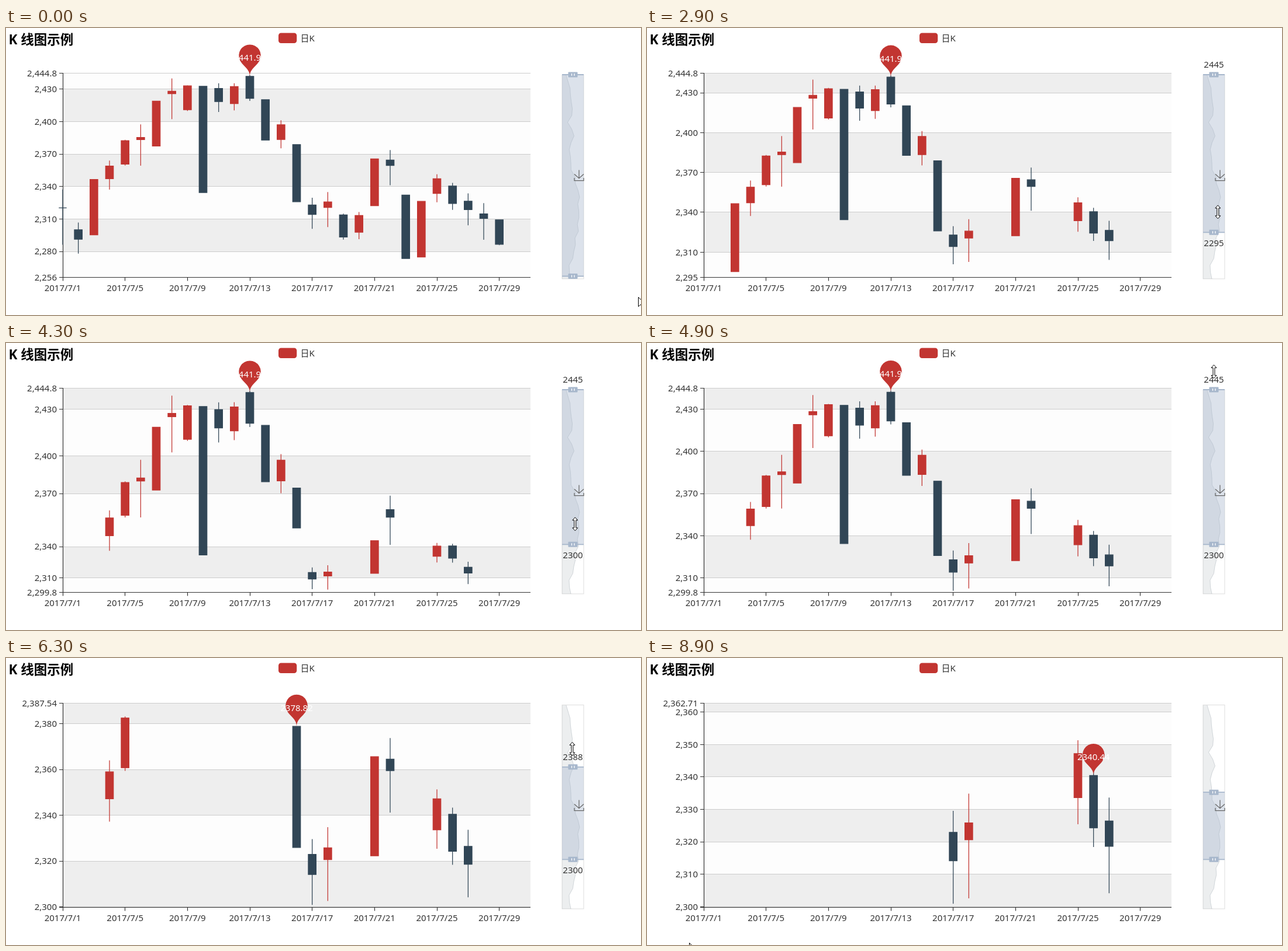
These frames come from a looping animation (1086 by 492 pixels, 9200 ms). An HTML page:

```html
<!DOCTYPE html>
<html lang="zh">
<head>
<meta charset="utf-8">
<style>
html, body { margin: 0; width: 100%; height: 100%; overflow: hidden; background: #fff; }
svg { display: block; font: 15px "Noto Sans", "Noto Sans CJK SC", "Noto Sans CJK", sans-serif; fill: #333; }
</style>
</head>
<body>
<svg id="stage" width="1086" height="492" viewBox="0 0 1086 492"></svg>
<script>
const LOOP = 9200, STEP = 100;
const LEFT = 97, RIGHT = 897, TOP = 77.5, BOTTOM = 427.5, GAP = 800 / 30;
const RED = '#c23531', DARK = '#314656', BLUE = '#a7b7cc';

// Short bodies get long wicks; the upper wick is half the lower one
function makeCandle([open, close]) {
  const wick = Math.max(0, 34 - 7 * Math.sqrt(Math.abs(close - open)));
  return { open, close, low: Math.min(open, close) - wick, high: Math.max(open, close) + wick / 2 };
}

// Daily open and close
const candles = [
  [2320.26, 2320.26], [2300, 2291.3], [2295.35, 2346.5], [2347.22, 2358.98], [2360.75, 2382.48],
  [2383.43, 2385.42], [2377.41, 2419.02], [2425.92, 2428.15], [2411, 2433.13], [2432.68, 2334.48],
  [2430.69, 2418.53], [2416.62, 2432.4], [2441.91, 2421.56], [2420.26, 2382.91], [2383.49, 2397.18],
  [2378.82, 2325.95], [2322.94, 2314.16], [2320.62, 2325.82], [2313.74, 2293.34], [2297.77, 2313.22],
  [2322.32, 2365.59], [2364.54, 2359.51], [2332.08, 2273.4], [2274.81, 2326.31], [2333.61, 2347.18],
  [2340.44, 2324.29], [2326.42, 2318.61], [2314.68, 2310.59], [2309.16, 2286.6]
].map(makeCandle);

// Turning points of the two slider handles: time, value
const lowKeys = [[1862, 2256], [1900, 2259.33], [2700, 2277], [2870, 2295], [3600, 2345], [4170, 2326], [4270, 2299.8]];
const highKeys = [[5400, 2444.8], [5700, 2408.36], [6950, 2362.71]];

const mix = (a, b, p) => a + (b - a) * p;

function track(keys, t) {
  const i = keys.findIndex(k => k[0] > t);
  if (i === 0) return keys[0][1];
  if (i < 0) return keys[keys.length - 1][1];
  const [t0, v0] = keys[i - 1], [t1, v1] = keys[i];
  return mix(v0, v1, (t - t0) / (t1 - t0));
}

const handles = t => ({ lo: track(lowKeys, t), hi: track(highKeys, t) });
const filterRange = t => handles(t - 30);   // the filter trails the handles

// The drawn scale eases towards the filtered range
function viewRange(t) {
  const a = filterRange(t - STEP), b = filterRange(t);
  return { lo: mix(a.lo, b.lo, 0.62), hi: mix(a.hi, b.hi, 0.62) };
}

const xAt = i => LEFT + i * GAP;
const scaleFor = ({ lo, hi }) => v => TOP + (hi - v) / (hi - lo) * (BOTTOM - TOP);
const sliderY = v => 80 + (2444.8 - v) * 1.83;

function isShown(candle, t) {
  const { lo, hi } = filterRange(t);
  return candle.low >= lo && candle.high <= hi;
}

const rect = (x, y, w, h, fill, more = '') =>
  `<rect x="${x}" y="${y}" width="${w}" height="${Math.max(0, h)}" fill="${fill}" ${more}/>`;
const stroke = (d, color, width = 1, more = '') =>
  `<path d="${d}" fill="none" stroke="${color}" stroke-width="${width}" ${more}/>`;
const text = (s, x, y, anchor = 'middle', more = '') =>
  `<text x="${x}" y="${y + 5.3}" text-anchor="${anchor}" ${more}>${s}</text>`;
const crisp = y => Math.floor(y) + 0.5;

function tickValues({ lo, hi }) {
  const raw = (hi - lo) / 5, unit = 10 ** Math.floor(Math.log10(raw)), f = raw / unit;
  const step = unit * (f < 1.5 ? 1 : f < 2.5 ? 2 : f < 4 ? 3 : f < 7 ? 5 : 10);
  const values = [];
  for (let v = Math.ceil(lo / step) * step; v < hi; v += step) if (v > lo) values.push(v);
  return values;
}

function axes(t) {
  const range = filterRange(t), { lo, hi } = range;
  const moving = scaleFor(viewRange(t)), settled = scaleFor(range);
  const before = tickValues(filterRange(t - STEP));
  const digits = hi - lo < 150 ? 2 : 1;
  // Ticks that were there already glide, new ones start in their final place
  const tickY = v => Math.min(BOTTOM, Math.max(TOP, (before.includes(v) ? moving : settled)(v)));
  const ticks = [{ v: lo, y: BOTTOM }, ...tickValues(range).map(v => ({ v, y: tickY(v) })), { v: hi, y: TOP }];

  const last = ticks.length - 1;
  let bands = '', lines = '', marks = '', labels = '';
  ticks.forEach((k, i) => {
    const next = ticks[i + 1];
    if (next) bands += rect(LEFT, next.y, RIGHT - LEFT, k.y - next.y, i % 2 ? '#eee' : '#fdfdfd');
    lines += `M${LEFT} ${crisp(k.y)}H${RIGHT}`;
    marks += `M91 ${crisp(k.y)}H${LEFT}`;
    const crowded = i === 0 && k.y - ticks[1].y < 13 || i === last && ticks[i - 1].y - k.y < 13;
    if (!crowded) {
      labels += text(k.v.toLocaleString('en-US', { maximumFractionDigits: digits }), 87, k.y, 'end');
    }
  });
  for (let i = 0; i < candles.length; i += 4) {
    marks += `M${crisp(xAt(i))} ${BOTTOM}v6`;
    labels += text('2017/7/' + (i + 1), xAt(i), 445.5);
  }
  marks += `M97.5 ${TOP - 0.5}V${BOTTOM}M${LEFT} ${BOTTOM}H${RIGHT}`;
  return bands + stroke(lines, '#ccc') + stroke(marks, '#333', 1.2) + labels;
}

// Candles that come back into range grow out of their opening value
function growth(candle, t) {
  let missing = 0.5;
  for (let i = 1; i <= 3; i++, missing /= 3) {
    if (!isShown(candle, t - i * STEP)) return 1 - missing;
  }
  return 1;
}

function drawCandle(candle, i, t, y) {
  if (!isShown(candle, t)) return '';
  const p = growth(candle, t), base = y(candle.open);
  const [close, low, high] = [candle.close, candle.low, candle.high].map(v => mix(base, y(v), p));
  const color = candle.close > candle.open ? RED : DARK;
  const x = xAt(i), top = Math.min(base, close), bottom = Math.max(base, close);
  return rect(x - 6.7, top, 13.4, bottom - top, color) +
    stroke(`M${x - 6.7} ${top}h13.4V${bottom}h-13.4ZM${x} ${top}V${high}M${x} ${bottom}V${low}`, color, 1.25);
}

// The pin marks the highest opening value in range
function pinTarget(t) {
  const shown = candles.filter(c => isShown(c, t));
  const best = shown.reduce((a, c) => c.open > a.open ? c : a);
  return { open: best.open, x: xAt(candles.indexOf(best)), y: scaleFor(viewRange(t))(best.open) };
}

function pin(t) {
  const now = pinTarget(t), before = pinTarget(t - STEP);
  const p = now.open === before.open ? 1 : 0.8;
  const x = mix(before.x, now.x, p), y = mix(before.y, now.y, p);
  const r = 18.75, h = 62.5, dy = r * r / (h - r), cy = -h + r + dy;
  const sin = dy / r, cos = Math.sqrt(1 - sin * sin), dx = cos * r;
  const bendX = dx - sin * r * 0.6, bendY = cy + dy + cos * r * 0.6, tip = -r * 0.7;
  const d = `M${-dx} ${cy + dy}A${r} ${r} 0 1 1 ${dx} ${cy + dy}` +
    `C${bendX} ${bendY} 0 ${tip} 0 0C0 ${tip} ${-bendX} ${bendY} ${-dx} ${cy + dy}Z`;
  return `<g transform="translate(${x} ${y})"><path d="${d}" fill="${RED}"/>` +
    text(now.open.toFixed(2), 0, -h / 2 - 0.5, 'middle', 'fill="#fff"') + '</g>';
}

function grip(y) {
  return stroke(`M951 ${y}H988`, BLUE, 1.8) + rect(961.5, y - 4.5, 16, 9, BLUE, 'rx="1"') +
    stroke(`M967.5 ${y - 2}v4M972 ${y - 2}v4`, '#fff', 1.3);
}

function slider(t) {
  const { lo, hi } = handles(t), yLo = sliderY(lo), yHi = sliderY(hi);
  const curve = candles.map((c, i) => `${963 + (c.open - 2295) * 0.1226} ${430 - i * 35 / 3}`).join('L') + 'L958 81';
  let out = rect(951, 80.5, 37, 349.5, '#fff', 'stroke="#ddd"') +
    `<path d="M951 430L${curve}H951Z" fill="#2f4554" fill-opacity=".09"/>` +
    stroke('M' + curve, '#2f4554', 0.6, 'opacity=".3"') +
    rect(951, yHi, 37, yLo - yHi, BLUE, 'fill-opacity=".4"') + grip(yHi) + grip(yLo);
  if (t >= 1300 && t < 7100) {
    const range = filterRange(t);
    out += text(Math.round(range.hi), 969.5, yHi - 17.5) + text(Math.round(range.lo), 969.5, yLo + 18.5);
  }
  return out;
}

const arrow = 'M0 0V16L4 12.5L7 18L9 17L6.5 11.5H12Z';
const resize = 'M0-11.5L4.5-6.5H1.5V6.5H4.5L0 11.5L-4.5 6.5H-1.5V-6.5H-4.5Z';
const pointer = (d, x, y) =>
  `<path d="${d}" transform="translate(${x} ${y})" fill="#fff" stroke="#000" stroke-linejoin="round"/>`;

function cursor(t) {
  if (t < 1300) {
    const p = Math.max(0, (t - 200) / 1000);
    return pointer(arrow, mix(1081.5, 987, p), mix(461.5, 407, p));
  }
  if (t < 7600) {
    const { lo, hi } = handles(t);
    const sway = 972 + 5 * Math.sin((t - 2100) / 4800 * 2 * Math.PI);
    const switched = Math.min(1, Math.max(0, (t - 4300) / 600));
    return pointer(resize, sway, mix(sliderY(lo) - 35, sliderY(hi) - 31, switched));
  }
  if (t < 7800) {
    const p = (t - 7600) / STEP;
    return pointer(arrow, mix(944, 1067, p), mix(222, 270, p));
  }
  return t >= 8900 ? pointer(arrow, 72.5, 488.5) : '';
}

const header =
  text('K 线图示例', 4.5, 23, 'start', 'font-size="22.5" font-weight="700" fill="#000"') +
  rect(466, 8.5, 31.25, 17.5, RED, 'rx="4.4"') + text('日K', 503.5, 17.3, 'start');

const download = stroke('M972 250.5L980 257.7L988 250.5M972 257V261.5H988V257M980 257.5V243.5', '#666', 1.25);

const stage = document.getElementById('stage');

function render(t) {
  const y = scaleFor(viewRange(t));
  stage.innerHTML = header + axes(t) + candles.map((c, i) => drawCandle(c, i, t, y)).join('') +
    pin(t) + slider(t) + download + cursor(t);
}

let shown = -1;
const start = performance.now();
function tick() {
  const t = Math.floor((performance.now() - start) % LOOP / STEP) * STEP;
  if (t !== shown) render(shown = t);
  requestAnimationFrame(tick);
}
tick();
</script>
</body>
</html>
```
